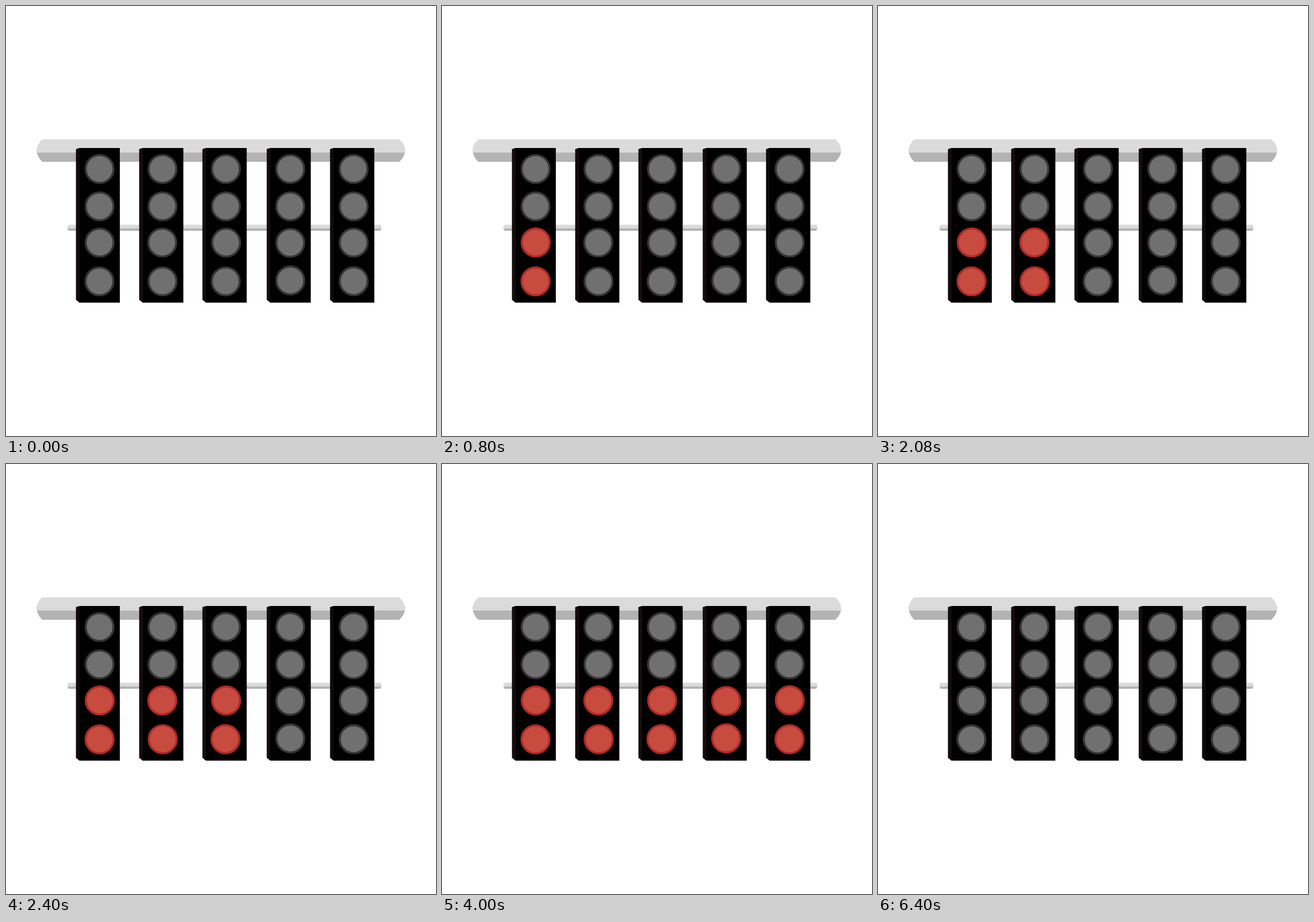
An HTML page that plays this animation: 748x748 px, repeating every 7190 ms.

```html
<!DOCTYPE html>
<html lang="en">
<head>
<meta charset="utf-8">
<title>Start lights</title>
<style>
  html, body { margin: 0; width: 100%; height: 100%; overflow: hidden; background: #fff; }
  svg { display: block; width: 100%; height: 100%; }
  .off { fill: #707070; stroke: #353535; stroke-width: 3.6; }
  .on { fill: #c84b40; stroke: #b02822; stroke-width: 3.4; }
  .lit { visibility: hidden; animation: 7190ms step-end infinite; }
  /* columns light up every 800 ms, all go out at 6400 ms */
  @keyframes lit0 { 0%, 89.0125% { visibility: hidden } 11.1266% { visibility: visible } 100% { visibility: hidden } }
  @keyframes lit1 { 0%, 89.0125% { visibility: hidden } 22.2531% { visibility: visible } 100% { visibility: hidden } }
  @keyframes lit2 { 0%, 89.0125% { visibility: hidden } 33.3797% { visibility: visible } 100% { visibility: hidden } }
  @keyframes lit3 { 0%, 89.0125% { visibility: hidden } 44.5063% { visibility: visible } 100% { visibility: hidden } }
  @keyframes lit4 { 0%, 89.0125% { visibility: hidden } 55.6328% { visibility: visible } 100% { visibility: hidden } }
</style>
</head>
<body>
<svg id="stage" viewBox="0 0 748 748">
  <path fill="#dbdbdb" d="M63 232H684Q694 240 694.5 251L694 255.5H53.5L53 251Q54 240 63 232Z"/>
  <path fill="#b3b3b3" d="M53.5 255H694Q692 264 684 271H63Q56 264 53.5 255Z"/>
  <path fill="#dbdbdb" d="M109 380.5H651Q653.5 382.5 653.5 385.5L653 387.2H107L106.5 385.5Q106.5 382.5 109 380.5Z"/>
  <path fill="#b3b3b3" d="M107 387H653L651 391H109Z"/>
</svg>
<script>
  const stage = document.getElementById('stage');

  function add(parent, tag, attrs) {
    const el = document.createElementNS('http://www.w3.org/2000/svg', tag);
    for (const key in attrs) el.setAttribute(key, attrs[key]);
    return parent.appendChild(el);
  }

  function lamp(parent, kind, cx, cy) {
    add(parent, 'circle', { class: kind, cx, cy, r: 24.3 });
  }

  // left and right edge, lamp centres for the upper pair, third and fourth row
  const columns = [
    { left: 121.7, right: 198, x: 162.8, third: [162.8, 411.5], fourth: [162.5, 479], lit: [[163.2, 411.3], [162.8, 479]] },
    { left: 231.7, right: 308.5, x: 272.2, third: [271.8, 411.5], fourth: [272.3, 479], lit: [[271.9, 411.3], [272.7, 478.7]] },
    { left: 341.7, right: 418.7, x: 382.6, third: [382.9, 411.6], fourth: [382.2, 479], lit: [[382.9, 411.3], [381.6, 478.6]] },
    { left: 453.6, right: 530.2, x: 494.5, third: [494.5, 412], fourth: [494.6, 477.4], lit: [[494.2, 412.2], [494.2, 477.2]] },
    { left: 563.7, right: 640.7, x: 604.7, third: [604.8, 411.5], fourth: [604.8, 478.7], lit: [[604.8, 410.8], [604.3, 478.8]] }
  ];

  columns.forEach((col, i) => {
    const { left, right, x } = col;
    add(stage, 'path', { fill: '#000', d: `M${left} 249L${left + 6} 247H${right}V516H${left + 6}L${left} 511Z` });
    add(stage, 'path', {
      fill: i < 4 ? '#160c0d' : '#0c0c0c',
      d: `M${left + .8} 250L${left + 6.3} 248.2V515L${left + .8} 510.5Z`
    });
    [[x, 283.5], [x, 348.5], col.third, col.fourth].forEach(p => lamp(stage, 'off', ...p));
    const group = add(stage, 'g', { class: 'lit', style: `animation-name: lit${i}` });
    col.lit.forEach(p => lamp(group, 'on', ...p));
  });
</script>
</body>
</html>
```
